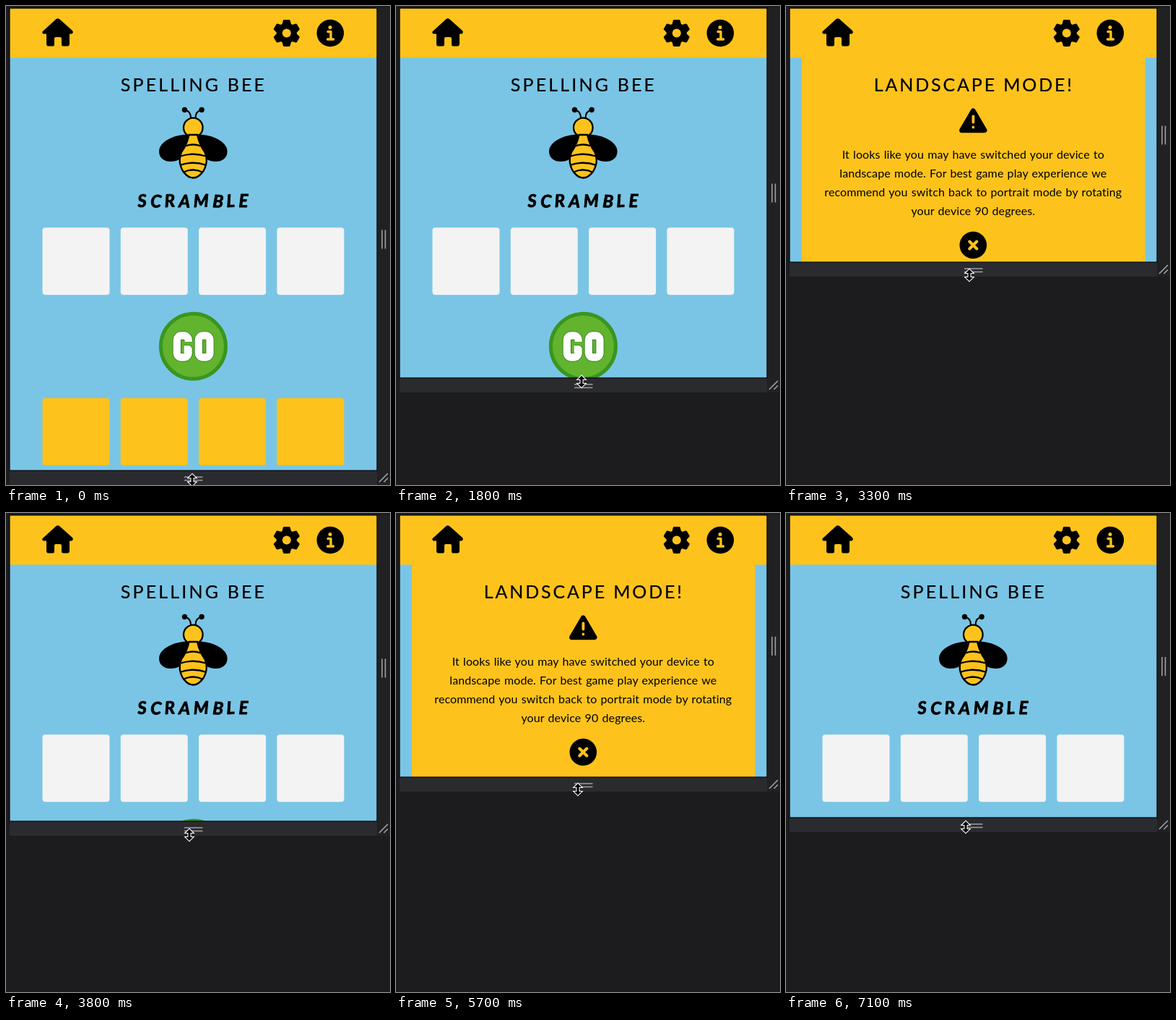
Recreate the animation shown at these times as an HTML page. Size 532 by 662 pixels, loop 7200 ms.

```html
<!DOCTYPE html>
<html lang="en">
<head>
<meta charset="utf-8">
<style>
  html, body { margin: 0; width: 100%; height: 100%; overflow: hidden; background: #1c1c1e; }
  svg { display: block; }
  text { font-family: Lato, sans-serif; text-anchor: middle; }
  .title { font-size: 25px; stroke: #000; stroke-width: .2; }
  .body { font-size: 16px; letter-spacing: .1px; word-spacing: 1px; }
  .marker { font-size: 24px; font-weight: 700; font-style: italic; letter-spacing: 5px;
            stroke: #000; stroke-width: .9; stroke-linejoin: round; }
  .line { fill: none; stroke-linecap: round; stroke-linejoin: round; }
  .grip { fill: none; stroke: #a0a0a2; stroke-width: 1.6; }
</style>
</head>
<body>
<svg width="532" height="662" viewBox="0 0 532 662">
  <defs>
    <clipPath id="clip"><rect id="view" x="5" y="3" width="509" height="639"/></clipPath>
    <path id="tooth" d="M-5-11L-3.5-17H3.5L5-11Z" stroke="#000" stroke-width="3" stroke-linejoin="round"/>
    <path id="go" class="line" style="stroke-linecap:butt" d="M252.6 464v-2.5a6 6 0 0 0-6-6h-3.8a6 6 0 0 0-6 6v18a6 6 0 0 0 6 6h3.8a6 6 0 0 0 6-6v-5h-6M272.800 455.500h3.700a6 6 0 0 1 6 6v18a6 6 0 0 1-6 6h-3.700a6 6 0 0 1-6-6v-18a6 6 0 0 1 6-6Z"/>
    <path id="wing" d="M259 179C244 174 212 184 212 201C212 220 242 219 250 202Z"/>
    <g id="feeler">
      <path class="line" stroke="#000" stroke-width="2" d="M248 144Q256 145 256 155"/>
      <circle cx="247.500" cy="143.500" r="3.700"/>
    </g>
  </defs>

  <rect y="660.500" width="532" height="1.500" fill="#251a1e"/>
  <rect id="side" x="514" y="3" width="18" fill="#212124"/>

  <g clip-path="url(#clip)">
    <rect x="5" y="3" width="509" height="640" fill="#7ac5e5"/>
    <rect x="5" y="3" width="509" height="68.500" fill="#fdc31c"/>

    <path d="M51 38Q49 36 52 34L69.500 18Q71.700 16.300 74 18L92 34Q94 37 91 38.500H88V52Q88 55.500 85 55.500H79Q77 55.500 77 53V45Q77 43 75 43H69Q67 43 67 45V53Q67 55.500 65 55.500H58.500Q56 55.500 56 52V38.500H53Q51.500 38.500 51 38Z"/>
    <g id="gear" transform="translate(388.800 37.500)"><circle r="14"/></g>
    <circle cx="449.300" cy="37.500" r="18.800"/>
    <circle cx="449" cy="29.500" r="2.500" fill="#fdc31c"/>
    <path class="line" stroke="#fdc31c" stroke-width="3.400" d="M446 35.500h4V46M445.500 46h8"/>

    <g id="game">
      <text class="title" x="260" y="117.500" letter-spacing="3.150">SPELLING BEE</text>
      <use href="#feeler"/>
      <use href="#feeler" transform="translate(518.600) scale(-1 1)"/>
      <use href="#wing"/>
      <use href="#wing" transform="translate(518.600) scale(-1 1)"/>
      <g stroke="#000" stroke-width="2.300" fill="#fdc31c">
        <circle cx="259.300" cy="168" r="13.300"/>
        <path d="M253.500 178H265.100Q268 192 275.500 202Q281 215 273.500 228Q267 237.500 259.300 237.500T245 228Q237.600 215 243 202Q250.600 192 253.500 178Z"/>
        <path fill="none" d="M249 193.500Q259.300 189.500 269.600 193.500M242 207.500Q259.300 202 276.600 207.500M241 220Q259.300 213.500 277.600 220M245.500 230Q259.300 223 273 230"/>
      </g>
      <text class="marker" x="261.500" y="278" rotate="-3 2 -3 2 -2 3 -3 0">SCRAMBLE</text>
      <g id="tiles"></g>
      <circle cx="259.400" cy="470.300" r="45" fill="#62b32e" stroke="#38961f" stroke-width="5"/>
      <use href="#go" stroke="#2c7a1a" stroke-width="12"/>
      <use href="#go" stroke="#fff" stroke-width="10.300"/>
    </g>

    <g id="notice">
      <rect x="22" y="71" width="475.500" height="580" fill="#fdc31c"/>
      <text class="title" x="260.400" y="117.500" letter-spacing="2.850">LANDSCAPE MODE!</text>
      <path d="M259.300 145L275 171.700H243.600Z" stroke="#000" stroke-width="7" stroke-linejoin="round"/>
      <path class="line" stroke="#fdc31c" stroke-width="3.800" d="M259.400 152.500V160.500M259.400 167.500v.1"/>
      <g class="body">
        <text x="259.300" y="211">It looks like you may have switched your device to</text>
        <text x="259.300" y="237">landscape mode. For best game play experience we</text>
        <text x="259.300" y="263">recommend you switch back to portrait mode by rotating</text>
        <text x="259.300" y="289">your device 90 degrees.</text>
      </g>
      <circle cx="259.300" cy="330.500" r="18.800"/>
      <path class="line" stroke="#fdc31c" stroke-width="4" d="M254.300 325.500l10 10m0-10l-10 10"/>
    </g>
  </g>

  <g id="bar">
    <rect x="5" width="509" height="20" fill="#2a2b2f"/>
    <path class="grip" d="M247 9H272.500M247 13.500H272.500M517 16L529 4M523.500 16L529 10.500"/>
  </g>
  <rect id="frame" x="5" y="3" width="509" fill="none" stroke="#08080a" stroke-width="1.200"/>
  <path id="sideGrip" class="grip" d="M521-13V13M525.500-13V13"/>
  <path id="cursor" d="M0-8l5 5H1.500V3H5L0 8l-5-5h3.500V-3H-5Z" stroke="#fff" stroke-width="2.200" paint-order="stroke"/>
</svg>

<script>
const LOOP = 7200, STEP = 100, NOTICE_BELOW = 378;
const $ = id => document.getElementById(id);

// [time, bottom edge of the resized page]
const edgeKeys = [[0, 642], [500, 640], [1000, 615], [1600, 543], [1800, 514], [2400, 394],
  [2800, 346], [3000, 338], [3300, 354], [4000, 453], [4150, 455], [4600, 422], [4800, 402],
  [5300, 345], [5450, 343], [5700, 365], [6150, 412], [6400, 421], [7200, 421]];
// [time, pointer x]
const pointerKeys = [[0, 258], [1800, 257], [2400, 255], [3300, 254], [4600, 254], [5700, 252],
  [7100, 249], [7200, 249]];

// Smooth curve through the keys, flat at turning points
function sample(keys, time) {
  const t = Math.min(time, LOOP - 1);
  const i = keys.findIndex(k => k[0] > t) - 1;
  const slope = j => {
    if (j === 0 || j === keys.length - 1) return 0;
    const [a, b, c] = [keys[j - 1], keys[j], keys[j + 1]];
    return (b[1] - a[1]) * (c[1] - b[1]) <= 0 ? 0 : (c[1] - a[1]) / (c[0] - a[0]);
  };
  const [t0, v0] = keys[i], [t1, v1] = keys[i + 1];
  const d = t1 - t0, u = (t - t0) / d, w = 1 - u;
  return w * w * ((1 + 2 * u) * v0 + u * d * slope(i)) +
         u * u * ((1 + 2 * w) * v1 - w * d * slope(i + 1));
}

function add(parent, tag, attrs) {
  const el = document.createElementNS('http://www.w3.org/2000/svg', tag);
  for (const name in attrs) el.setAttribute(name, attrs[name]);
  parent.append(el);
}

for (let i = 0; i < 6; i++) add($('gear'), 'use', { href: '#tooth', transform: `rotate(${i * 60})` });
add($('gear'), 'circle', { r: 6, fill: '#fdc31c' });
for (const [y, fill] of [[306.3, '#f3f3f3'], [542, '#fdc31c']])
  for (let i = 0; i < 4; i++)
    add($('tiles'), 'rect', { x: 50.5 + i * 108.3, y, width: 93, height: 93, rx: 4, fill });

const place = (id, x, y) => $(id).setAttribute('transform', `translate(${x} ${y})`);

function draw(now) {
  const t = Math.floor(now % LOOP / STEP) * STEP;
  const edge = Math.round(sample(edgeKeys, t));
  const landscape = edge < NOTICE_BELOW;
  $('view').setAttribute('height', edge - 3);
  $('frame').setAttribute('height', edge - 3);
  $('side').setAttribute('height', edge + 17);
  $('game').style.display = landscape ? 'none' : '';
  $('notice').style.display = landscape ? '' : 'none';
  place('bar', 0, edge);
  place('sideGrip', 0, (edge + 3) / 2);
  // The pointer runs slightly ahead of the edge it drags
  place('cursor', Math.round(sample(pointerKeys, t)), Math.round(sample(edgeKeys, t + 40) + 13));
  requestAnimationFrame(draw);
}
draw(performance.now());
</script>
</body>
</html>
```
